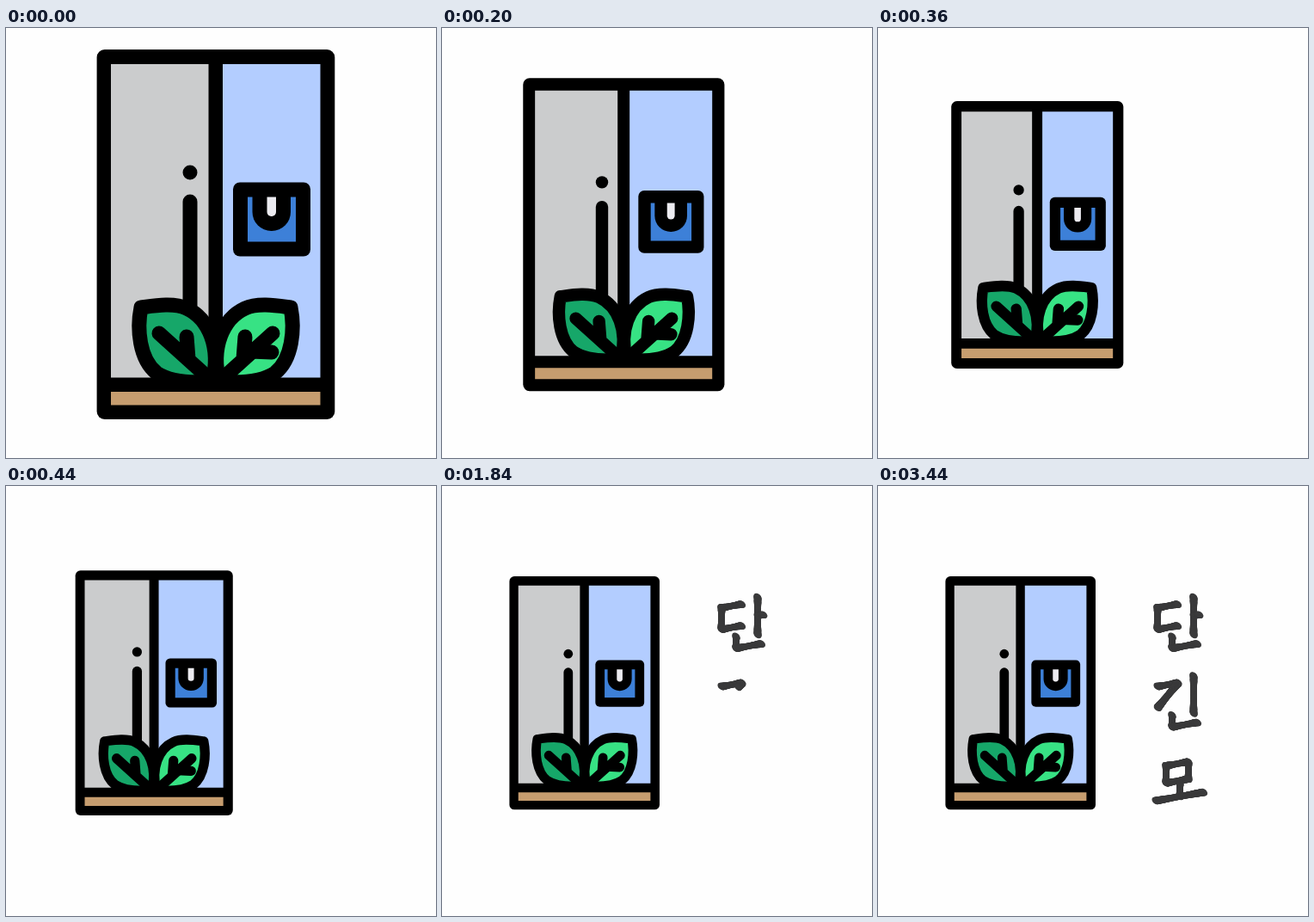
These frames come from a looping animation (500 px wide and 500 px high, 5000 ms). An HTML page with a canvas:

```html
<!DOCTYPE html>
<html lang="ko">
<head>
<meta charset="utf-8">
<title>단긴모</title>
<style>
html, body { margin: 0; width: 100%; height: 100%; overflow: hidden; background: #fefefe; }
canvas { display: block; width: 500px; height: 500px; }
</style>
</head>
<body>
<canvas width="500" height="500" role="img" aria-label="단긴모"></canvas>
<script>
const ctx = document.querySelector('canvas').getContext('2d');
const LOOP = 5000, STEP = 40;
const BLACK = '#000', INK = '#3a3a3b', PAPER = '#fefefe';
const LEFT = 105.6, TOP = 25, WALL = 17;

const leaf = new Path2D('M157 325C152 350 155 385 175 401C190 411 215 413 240 411C250 372 236 338 210 326C195 319 172 323 157 325Z');
const veins = new Path2D('M178 355L240 411M210 359L212 385');
const sideVein = new Path2D('M179 377L203 376');

// Each digit is a point of a 3x3 grid, numbered row by row
const jamo = {
  ㄱ: '026', ㄴ: '068', ㄷ: '02 068', ㅁ: '06 028 68',
  ㅏ: '17 45', ㅣ: '17', ㅗ: '17 68'
};

// Places of the letters in a syllable: centre, size, and share of the writing time
const closed = [
  { x: 337, y: 152, w: 24, h: 25, from: 0, to: 0.4 },
  { x: 367, y: 151, w: 14, h: 44, from: 0.5, to: 0.65 },
  { x: 357, y: 179, w: 30, h: 14, from: 0.75, to: 1 }
];
const open = [
  { x: 348, y: 333, w: 26, h: 20, from: 0, to: 0.4 },
  { x: 351, y: 353, w: 56, h: 16, from: 0.5, to: 1 }
];
const word = [
  { letters: 'ㄷㅏㄴ', start: 600, time: 800, places: closed, down: 0 },
  { letters: 'ㄱㅣㄴ', start: 1600, time: 1000, places: closed, down: 91.5 },
  { letters: 'ㅁㅗ', start: 2840, time: 600, places: open, down: 0 }
];

function box(x, y, r, b, color, radius = 0) {
  ctx.fillStyle = color;
  ctx.beginPath();
  ctx.roundRect(x, y, r - x, b - y, radius);
  ctx.fill();
}

function drawHandle(x, y1, y2) {
  ctx.strokeStyle = BLACK;
  ctx.lineWidth = WALL;
  ctx.beginPath();
  ctx.moveTo(x, y1);
  ctx.lineTo(x, y2);
  ctx.stroke();
}

function drawLeaf(color, mirrored) {
  ctx.save();
  if (mirrored) {
    ctx.translate(488, 0);
    ctx.scale(-1, 1);
  }
  ctx.fillStyle = color;
  ctx.strokeStyle = BLACK;
  ctx.lineWidth = WALL;
  ctx.fill(leaf);
  ctx.stroke(leaf);
  ctx.stroke(veins);
  if (mirrored) ctx.stroke(sideVein);
  ctx.restore();
}

// Steady shrink that settles softly at the end
function shrink(t) {
  const rate = 1 / 480, bend = 440;
  if (t < bend) return t * rate;
  const u = Math.min(1, (t - bend) / 120);
  return 1 - (1 - bend * rate) * (1 - u) ** 3;
}

function drawFridge(t) {
  const p = shrink(t), s = 1 - 0.369 * p;
  ctx.save();
  ctx.translate(LEFT - 27.2 * p, TOP + 80 * p);
  ctx.scale(s, s);
  ctx.translate(-LEFT, -TOP);
  ctx.lineCap = ctx.lineJoin = 'round';

  box(LEFT, TOP, 382.3, 455, BLACK, 9);
  box(122, 42, 235.5, 406.5, '#cbcccd');
  box(252, 42, 365.5, 406.5, '#b3cdff');
  box(122, 423, 365.5, 438.5, '#c69d6f');

  drawHandle(214, 168, 168.01);
  drawHandle(214, 202, 340);

  box(264, 179.5, 354, 265.5, BLACK, 8);
  box(281, 196.5, 337, 248.5, '#3d80d8');
  box(286.5, 188, 331, 236, BLACK, [0, 0, 22, 22]);
  box(303.5, 196.5, 314, 219, '#ecebf0', [0, 0, 5, 5]);

  drawLeaf('#16a769', false);
  drawLeaf('#37e284', true);
  box(235.5, 340, 252, 415, BLACK);
  ctx.restore();
}

function dab(x, y, r) {
  ctx.beginPath();
  ctx.ellipse(x, y, r * 1.1, r * 0.75, 0.7, 0, 7);
  ctx.fill();
}

// Grid points of a letter, with lines that rise to the right
function gridPoint(digit, { x, y, w, h }) {
  const dx = (digit % 3 - 1) * w / 2, dy = (Math.floor(digit / 3) - 1) * h / 2;
  return [x + dx, y + dy - 0.18 * dx];
}

function drawLetter(letter, place, down, u) {
  const lines = jamo[letter].split(' ').flatMap(stroke => {
    const pts = [...stroke].map(d => gridPoint(d, place));
    return pts.slice(1).map((end, i) => [pts[i], end]);
  });
  const size = ([[x1, y1], [x2, y2]]) => Math.hypot(x2 - x1, y2 - y1);
  let ink = u * lines.reduce((sum, l) => sum + size(l), 0);
  ctx.fillStyle = INK;
  for (const l of lines) {
    const [[x1, y1], [x2, y2]] = l, length = size(l);
    for (let d = 0; d <= Math.min(length, ink); d += 0.5) {
      const k = d / length;
      dab(x1 + (x2 - x1) * k, y1 + (y2 - y1) * k + down, 4.7 - Math.sin(Math.PI * k));
    }
    ink -= length;
    if (ink <= 0) return;
  }
}

function drawWord(t) {
  for (const { letters, start, time, places, down } of word) {
    places.forEach((place, i) => {
      const from = start + time * place.from, to = start + time * place.to;
      if (t < from) return;
      const u = Math.min(1, (t - from + STEP) / (to - from + STEP));
      drawLetter(letters[i], place, down, u ** 1.5);
    });
  }
}

function draw(elapsed) {
  const t = Math.floor(elapsed % LOOP / STEP) * STEP;
  ctx.fillStyle = PAPER;
  ctx.fillRect(0, 0, 500, 500);
  drawFridge(t);
  drawWord(t);
}

let begin;
function loop(now) {
  begin ??= now;
  draw(now - begin);
  requestAnimationFrame(loop);
}
draw(0);
requestAnimationFrame(loop);
</script>
</body>
</html>
```
